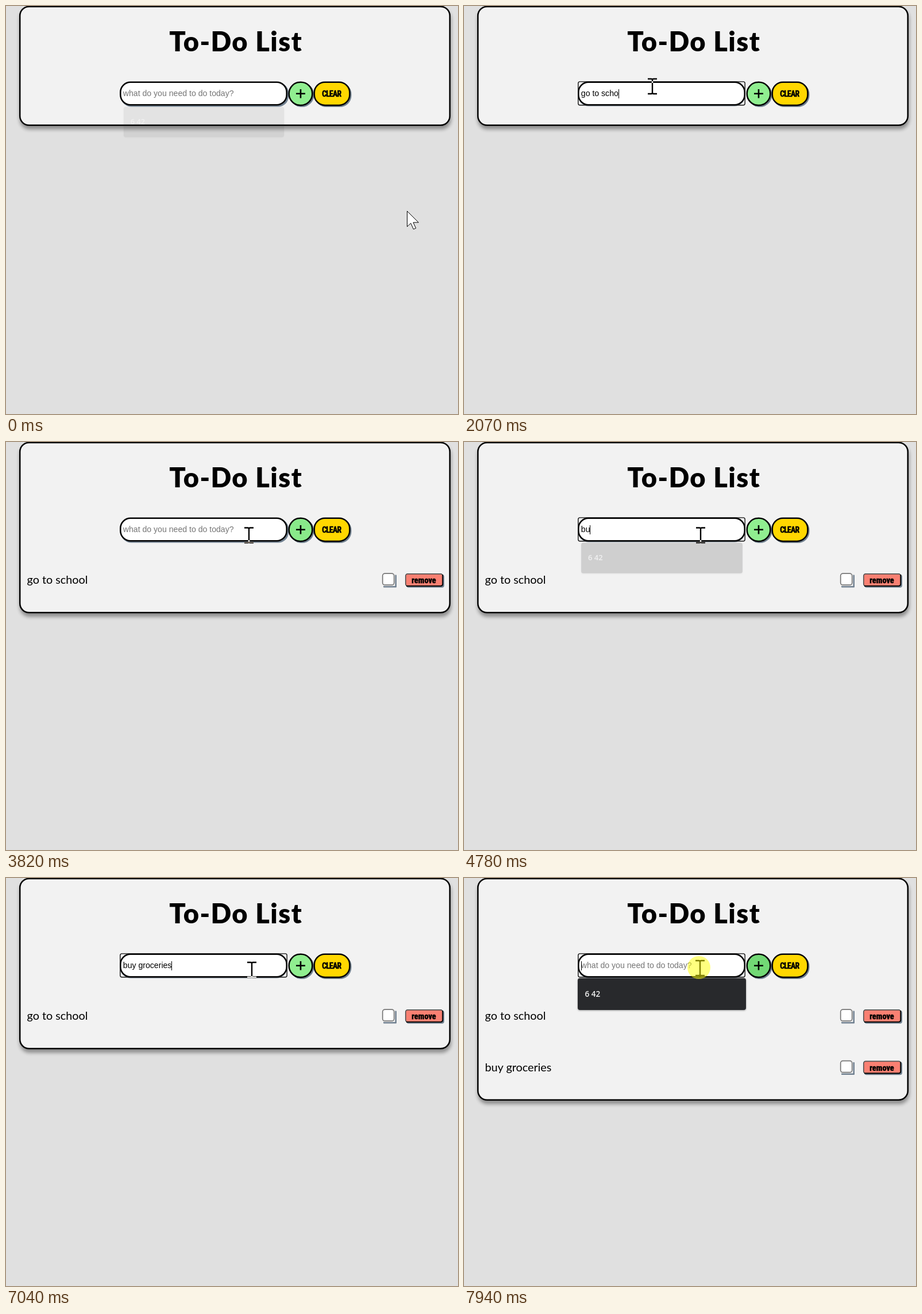
An HTML page for the animation above (8 s loop, 787 by 711 pixels).

```html
<!DOCTYPE html>
<html lang="en">
<head>
<meta charset="utf-8">
<title>To-Do List</title>
<style>
  html, body { margin: 0; width: 100%; height: 100%; overflow: hidden; background: #e0e0e0; }
  svg { display: block; width: 787px; height: 711px; }
  text { white-space: pre; }
  .title { font: 900 47px Lato, sans-serif; letter-spacing: 1.4px; }
  .item { font: 19.8px Lato, sans-serif; }
  .field { font: 14.1px "Liberation Sans", Arial, sans-serif; }
  .hint { font: 600 13.5px "Open Sans", sans-serif; fill: #f1f1f1; }
  .label {
    font: 900 14.4px "Roboto Condensed", "Open Sans Condensed", Roboto, sans-serif;
    font-stretch: condensed; text-anchor: middle; stroke: #000; stroke-width: .5;
  }
  .tight { font-size: 13.8px; letter-spacing: -.8px; }
  .edge { stroke: #000; stroke-width: 2.5; }
  .drop { fill: #708090; }
  #beam { mix-blend-mode: difference; }
</style>
</head>
<body>
<svg viewBox="0 0 787 711">
  <defs>
    <filter id="soft" x="-5%" y="-10%" width="110%" height="125%"><feGaussianBlur stdDeviation="3.4"/></filter>
    <filter id="thin" x="-5%" y="-15%" width="110%" height="130%"><feGaussianBlur stdDeviation="1.4"/></filter>
    <g id="controls">
      <rect class="drop" x="657" y="231.5" width="23" height="22" rx="1"/>
      <rect x="654" y="228" width="23.5" height="23" fill="#f2f2f2"/>
      <rect x="655.7" y="229.2" width="20" height="20" rx="4" fill="#fff" stroke="#767676" stroke-width="1.7"/>
      <rect class="drop" x="697" y="231" width="66" height="22.7" rx="4"/>
      <rect x="695.8" y="229.8" width="64.5" height="21" rx="3.5" fill="#fa8072" stroke="#555" stroke-width="1.7"/>
      <path d="M697 250.8H757Q760.3 250.8 760.3 247.5V231" fill="none" stroke="#000" stroke-width="1.7"/>
      <text class="label" x="727.5" y="246">remove</text>
    </g>
  </defs>

  <rect width="787" height="711" fill="#e0e0e0"/>
  <rect id="shade" x="24" y="6" width="751" rx="17" fill="#000" opacity=".37" filter="url(#soft)"/>
  <rect id="panel" class="edge" x="24.2" y=".9" width="748.6" rx="16" fill="#f2f2f2"/>
  <text class="title" x="400.2" y="79" text-anchor="middle">To-Do List</text>

  <rect id="fieldDrop" class="drop" y="133.5" rx="18"/>
  <rect class="edge" x="199.3" y="132.7" width="289.4" height="39.6" rx="17.5" fill="#fff"/>
  <rect id="ring" x="198.8" y="131.9" width="290.4" height="40.8" rx="3" fill="none" stroke="#111" stroke-width="1.4"/>
  <text id="entry" class="field" x="203.8" y="157"></text>
  <rect id="caret" y="145" width="1" height="16"/>

  <rect class="drop" x="493.5" y="133.5" width="43" height="42.5" rx="21"/>
  <rect id="add" class="edge" x="492.7" y="132.7" width="40.6" height="40.2" rx="20"/>
  <path d="M505 152.8H521M513 145V160.6" stroke="#000" stroke-width="2.6"/>
  <rect class="drop" x="537.5" y="133.5" width="64" height="42.5" rx="20"/>
  <rect class="edge" x="536.8" y="132.7" width="61.6" height="40.2" rx="18.5" fill="#ffd700"/>
  <text class="label tight" x="566.8" y="158">CLEAR</text>

  <g id="row0"><text class="item" x="36.5" y="247">go to school</text><use href="#controls"/></g>
  <g id="row1" transform="translate(0 89.5)"><text class="item" x="36.5" y="247">buy groceries</text><use href="#controls"/></g>

  <g id="popup">
    <rect x="198" y="175.5" width="293" height="55.5" rx="4" opacity=".35" filter="url(#thin)"/>
    <rect x="198" y="174.5" width="293" height="55.5" rx="4" fill="#28292c"/>
    <text class="hint" x="210.5" y="206.7">6 42</text>
  </g>

  <path id="beam" d="M-8 -13H-2Q0 -13 0 -11Q0 -13 2 -13H8M0 -12V12M-8 13H-2Q0 13 0 11Q0 13 2 13H8" fill="none" stroke="#fff" stroke-width="2.4"/>
  <path id="arrow" d="M.5 .5V27.5L6.8 21.5L11.5 32L15.7 30.2L11 20.2H20.3Z" fill="#fff" stroke="#000"/>
  <circle id="click" r="20" fill="#ff0" opacity=".5"/>
</svg>
<script>
const LOOP = 8000, ROW = 89.5;
const $ = id => document.getElementById(id);
const set = (id, attrs) => { for (const k in attrs) $(id).setAttribute(k, attrs[k]); };
const show = (id, on) => set(id, { visibility: on ? 'visible' : 'hidden' });

// time, x, y, shape
const pointer = [
  [0, 698, 357, 'arrow'], [70, 688, 325, 'arrow'], [150, 620, 205, 'arrow'], [220, 530, 92, 'arrow'],
  [290, 455, 67, 'beam'], [360, 370, 110, 'beam'], [430, 327, 147, 'beam'], [730, 328, 140, 'beam'],
  [2880, 340, 142, 'beam'], [2950, 395, 146, 'beam'], [3020, 455, 147, 'beam'], [3090, 496, 145, 'arrow'],
  [3200, 508, 144, 'arrow'], [3280, 512, 144, 'arrow'], [3670, 475, 155, 'beam'], [3740, 440, 160, 'beam'],
  [3820, 423, 162.5, 'beam'], [3900, 412, 162.5, 'beam'], [7040, 428, 160, 'beam'], [7110, 455, 157, 'beam'],
  [7190, 494, 150, 'arrow'], [7270, 515, 147, 'arrow'], [7350, 525, 148, 'arrow'], [7730, 500, 152, 'arrow'],
  [7800, 445, 156, 'beam'], [7860, 411, 157, 'beam']
];
const popup = [
  [0, .07], [70, 0], [660, .4], [730, 1], [1050, .92], [1130, .4], [1210, 0],
  [3940, .35], [4000, .75], [4060, 1], [4630, .92], [4700, .5], [4780, .17], [4840, 0],
  [7860, .5], [7940, 1]
];
const hover = [
  [0, 0], [3080, 0], [3300, 1], [3600, 1], [3840, 0],
  [7180, 0], [7380, 1], [7740, 1], [8050, 0]
];
// focus spans with the moment of each keystroke
const sessions = [
  { from: 640, to: 3430, text: 'go to school',
    keys: [1050, 1210, 1350, 1520, 1520, 1670, 1750, 1820, 1900, 2070, 2200, 2350] },
  { from: 3940, to: 7430, text: 'buy groceries',
    keys: [4630, 4700, 4840, 5000, 5150, 5220, 5300, 5450, 5620, 5700, 5790, 5880, 5960] },
  { from: 7860, to: LOOP, text: '', keys: [] }
];
const clicks = [[580, 730], [3940, 4060], [7860, LOOP]];

const inside = (t, [a, b]) => t >= a && t < b;
const latest = (list, t) => list.filter(k => k[0] <= t).pop();
function blend(list, t) {
  const i = list.findIndex(k => k[0] > t), [t0, a] = list[i - 1], [t1, b] = list[i];
  return a + (b - a) * (t - t0) / (t1 - t0);
}
const pen = document.createElement('canvas').getContext('2d');
pen.font = '14.1px "Liberation Sans", Arial, sans-serif';

function drawField(t) {
  const s = sessions.find(s => inside(t, [s.from, s.to]));
  const keys = s ? s.keys.filter(k => k <= t) : [];
  const typed = s ? s.text.slice(0, keys.length) : '';
  $('entry').textContent = typed || 'what do you need to do today?';
  set('entry', { fill: typed ? '#000' : '#757575' });
  show('ring', s);
  set('fieldDrop', s ? { x: 199, width: 290, height: 41 } : { x: 200, width: 292, height: 42 });
  const since = s ? t - (keys.length ? keys[keys.length - 1] : s.from) : 0;
  show('caret', s && since % 1060 < 530);
  set('caret', { x: Math.round(203.8 + pen.measureText(typed).width) });
}

function drawPopup(t) {
  const p = latest(popup, t)[1], k = .95 + .05 * p;
  set('popup', { opacity: p, transform: `translate(344.5 201.5) scale(${k}) translate(-344.5 -201.5)` });
}

function drawPointer(t) {
  const [, x, y, shape] = latest(pointer, t);
  for (const id of ['arrow', 'beam']) {
    show(id, id === shape);
    set(id, { transform: `translate(${x} ${y})` });
  }
  show('click', clicks.some(c => inside(t, c)));
  set('click', { cx: x - 2, cy: y - 1 });
}

function render(t) {
  const rows = (t >= 3430) + (t >= 7430);
  set('panel', { height: 206.9 + rows * ROW });
  set('shade', { height: 209 + rows * ROW });
  show('row0', rows > 0);
  show('row1', rows > 1);
  const h = blend(hover, t), mix = (a, b) => Math.round(a + (b - a) * h);
  set('add', { fill: `rgb(${mix(144, 60)},${mix(238, 176)},${mix(144, 67)})` });
  drawField(t);
  drawPopup(t);
  drawPointer(t);
}

const start = performance.now();
function tick() {
  render((performance.now() - start) % LOOP);
  requestAnimationFrame(tick);
}
tick();
</script>
</body>
</html>
```
